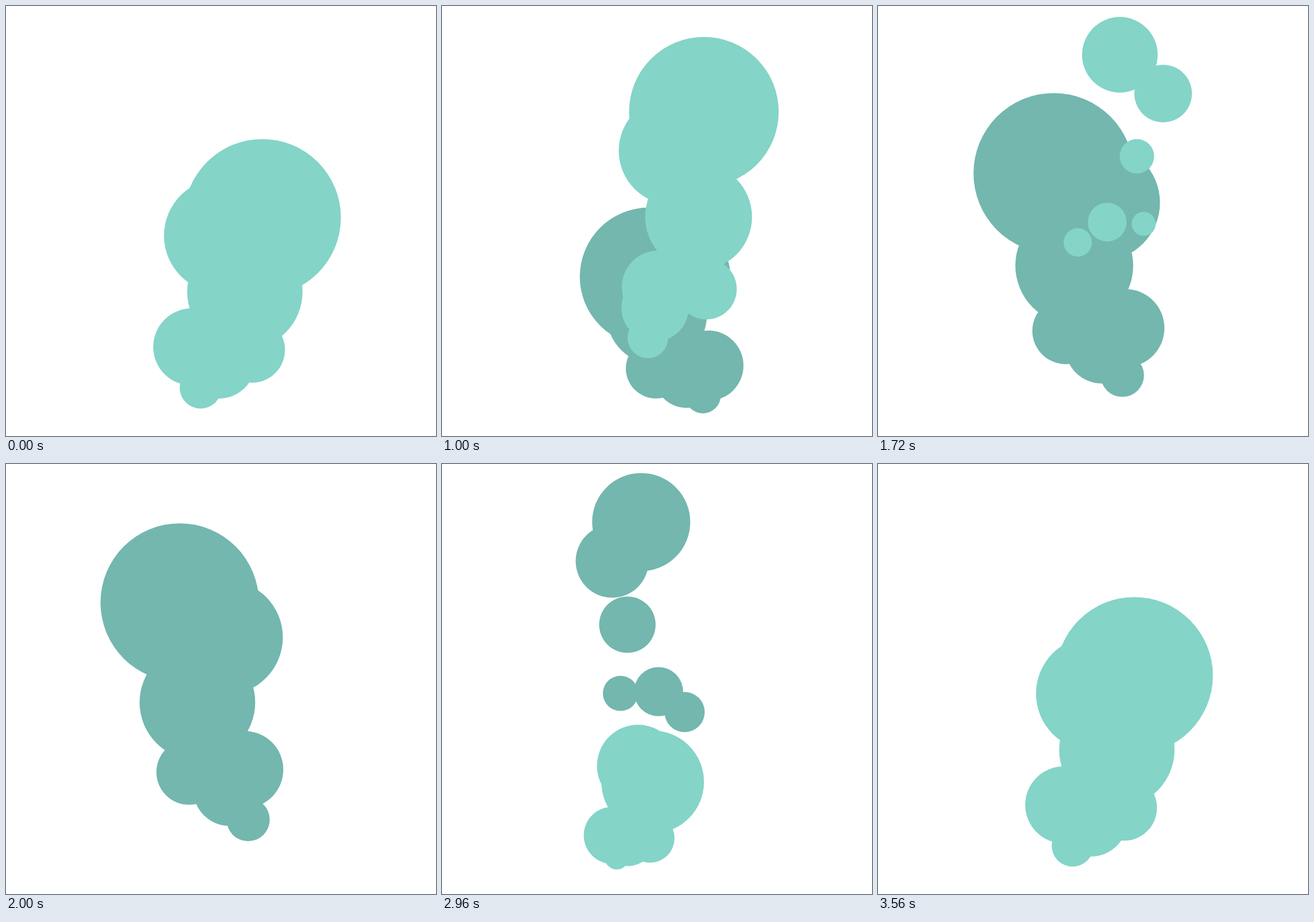
Write an HTML page with a canvas that moves like this. It is 748 by 748 pixels and loops after 3.6 s.

```html
<!DOCTYPE html>
<html lang="en">
<head>
<meta charset="utf-8">
<title>Rising bubbles</title>
<style>
  html, body { margin: 0; height: 100%; overflow: hidden; background: #fff; }
  canvas { display: block; }
</style>
</head>
<body>
<canvas id="stage" width="748" height="748"></canvas>
<script>
const ctx = document.getElementById('stage').getContext('2d');
const STEP = 40, LOOP = 3600, CYCLE = 3560, LEAD = 1000;
const GROW = 285; // time constant of the swelling, in ms
const keyTimes = [-920, -800, -600, 0, 600, 1280, 1600];

// size, birth, death, shrink time constant, then the path at keyTimes
const bubbles = [
  { size: 144.5, birth: -875, death: 1975, fade: 420,
    x: [262, 304.5, 366.5, 446, 470.5, 440, 426], y: [680, 630, 553, 368, 248, 144, 101] },
  { size: 104, birth: -932, death: 1996, fade: 420,
    x: [301.5, 312.5, 341, 374, 389, 424.5, 476.5], y: [601, 580, 525, 399.5, 307.5, 213.5, 169] },
  { size: 107, birth: -850, death: 1858, fade: 420,
    x: [320, 340, 375, 415.5, 438.5, 449, 450], y: [610, 592, 565, 497, 420, 327.5, 279.5] },
  { size: 70, birth: -950, death: 1996, fade: 420,
    x: [273, 279.5, 296, 323, 355, 388, 395.8], y: [672, 662, 646, 593, 536, 449.5, 396] },
  { size: 66, birth: -920, death: 1917, fade: 420,
    x: [285, 300, 324, 371, 384.5, 358.5, 350.5], y: [672, 664, 655, 620, 571, 485.5, 431.5] },
  { size: 60, birth: -953, death: 1900, fade: 420,
    x: [285, 309, 362, 428, 453, 461.5, 462], y: [678, 667.5, 651, 598, 540.5, 452.5, 399] },
  { size: 38.5, birth: -830, death: 1600, fade: 240,
    x: [288, 293, 304, 338.5, 350.7, 354.5, 334], y: [692, 689, 684, 664, 622.5, 538, 486] }
];

// Smooth curve through the key values, straight beyond the last one
function curve(values, t) {
  const last = keyTimes.length - 1;
  const secant = i => (values[i + 1] - values[i]) / (keyTimes[i + 1] - keyTimes[i]);
  const slope = i => {
    if (i === 0) return secant(0);
    if (i === last) return secant(last - 1);
    const before = keyTimes[i] - keyTimes[i - 1], after = keyTimes[i + 1] - keyTimes[i];
    return (secant(i - 1) * after + secant(i) * before) / (before + after);
  };
  if (t <= keyTimes[0]) return values[0] + slope(0) * (t - keyTimes[0]);
  if (t >= keyTimes[last]) return values[last] + slope(last) * (t - keyTimes[last]);
  let i = 0;
  while (t > keyTimes[i + 1]) i++;
  const span = keyTimes[i + 1] - keyTimes[i], u = (t - keyTimes[i]) / span, v = 1 - u;
  return v * v * ((1 + 2 * u) * values[i] + u * span * slope(i))
       + u * u * ((1 + 2 * v) * values[i + 1] - v * span * slope(i + 1));
}

const ease = (elapsed, constant) => 1 - Math.exp(-elapsed / constant);

function drawCloud(time, color, mirrored) {
  const t = (time + LEAD + CYCLE) % CYCLE - LEAD;
  ctx.fillStyle = color;
  for (const b of bubbles) {
    if (t <= b.birth || t >= b.death) continue;
    const x = curve(b.x, t);
    const radius = b.size * ease(t - b.birth, GROW) * ease(b.death - t, b.fade);
    ctx.beginPath();
    ctx.arc(mirrored ? 772.5 - x : x, curve(b.y, t), radius, 0, 2 * Math.PI);
    ctx.fill();
  }
}

function frame() {
  const time = Math.floor(performance.now() % LOOP / STEP) * STEP;
  ctx.fillStyle = '#fff';
  ctx.fillRect(0, 0, 748, 748);
  drawCloud(time - 1360, '#73b7af', true);
  drawCloud(time, '#84d4c8', false);
  requestAnimationFrame(frame);
}
frame();
</script>
</body>
</html>
```
